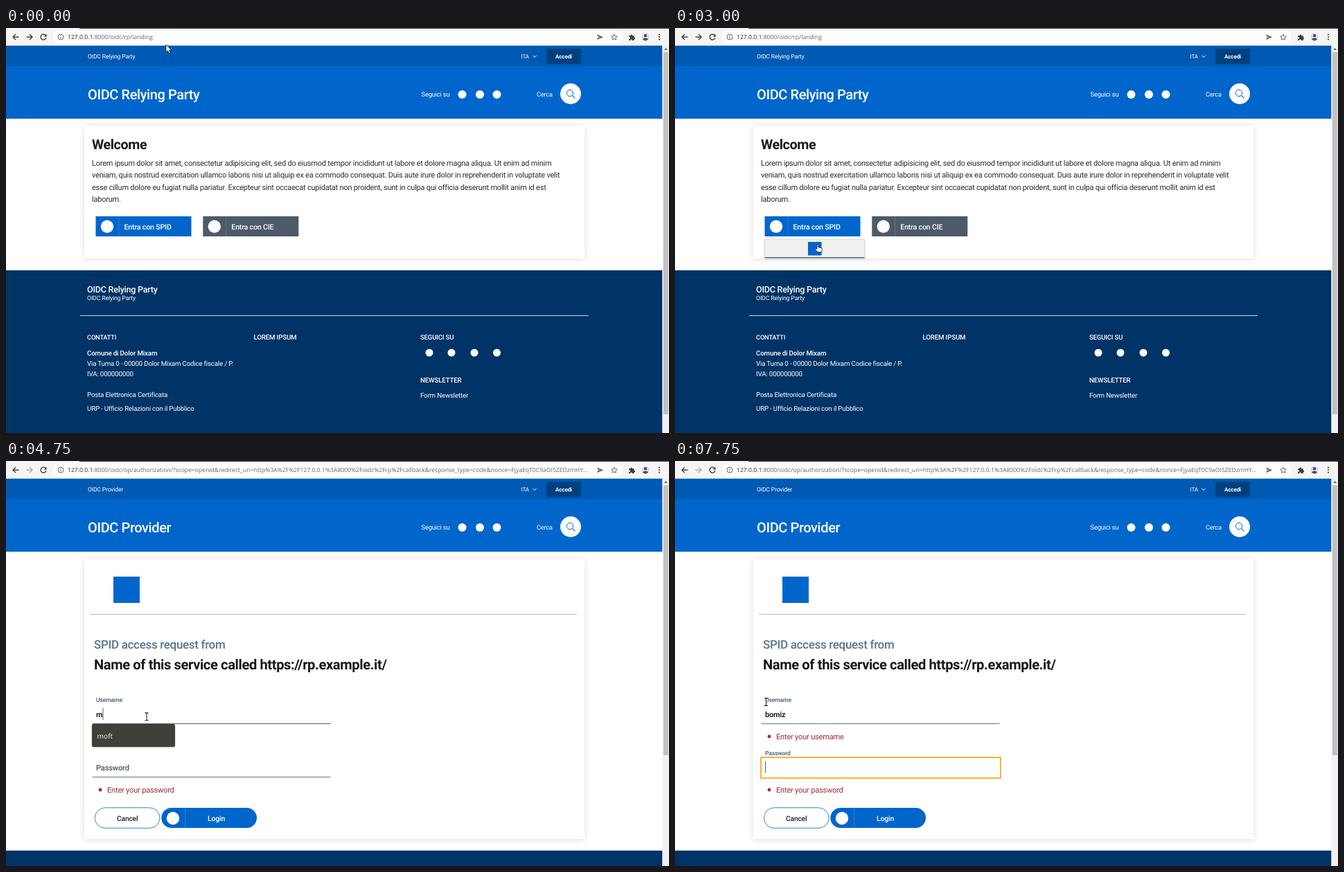
These frames come from a looping animation (957x585 px, 8 s). An HTML page:

```html
<!DOCTYPE html>
<html lang="it">
<head>
<meta charset="utf-8">
<title>OIDC login</title>
<style>
html, body { margin: 0; width: 100%; height: 100%; overflow: hidden; background: #fff; }
svg { display: block; width: 100vw; height: 100vh; }
text { font-family: Roboto, "Open Sans", sans-serif; letter-spacing: -.02em; text-rendering: geometricPrecision; white-space: pre; }
.ui { font-family: "Open Sans", "Noto Sans", sans-serif; letter-spacing: 0; }
</style>
</head>
<body>
<svg id="stage" viewBox="0 0 957 585" xmlns="http://www.w3.org/2000/svg"></svg>
<script>
const LOOP = 8000, TICK = 125;
const BLUE = '#0066cc', INK = '#19191a', SLATE = '#5a768a', RED = '#a32a35', SELECT = '#87a556';

const text = (x, y, str, size, fill = '#fff', weight = 400, extra = '') =>
  `<text x="${x}" y="${y}" font-size="${size}" fill="${fill}" font-weight="${weight}" ${extra}>${str}</text>`;
const rect = (x, y, w, h, fill, extra = '') =>
  `<rect x="${x}" y="${y}" width="${w}" height="${h}" fill="${fill}" ${extra}/>`;
const dot = (x, y, r, fill = '#fff', extra = '') =>
  `<circle cx="${x}" cy="${y}" r="${r}" fill="${fill}" ${extra}/>`;
const line = (d, stroke, width = 1, extra = '') =>
  `<path d="${d}" fill="none" stroke="${stroke}" stroke-width="${width}" ${extra}/>`;
const group = (id, body) => `<g id="${id}">${body}</g>`;
const card = h => rect(113, 141, 722, h, '#fff', 'filter="url(#soft)"');
const shadow = (id, dy, blur, alpha) =>
  `<filter id="${id}" x="-10%" y="-30%" width="120%" height="160%"><feDropShadow dx="0" dy="${dy}" stdDeviation="${blur}" flood-opacity="${alpha}"/></filter>`;

function toolbar() {
  const grey = '#5f6368', dark = '#3c4043';
  return rect(0, 0, 957, 25.5, '#f6f5f4') + rect(106, 0, 851, 1, '#3b3a38')
    + rect(67.5, 3.5, 822, 19, '#fff', 'rx="9.5" id="pill" stroke="#1e8537" stroke-width="0"')
    + line('M18.5 13H10M14 9l-4 4 4 4', dark, 1.4)
    + line('M29.5 13H38M34 9l4 4-4 4', dark, 1.4, 'id="forward"')
    + line('M57.2 10.4A4 4 0 1 0 58 14', dark, 1.4) + `<path d="M58.6 8.6v4h-4z" fill="${dark}"/>`
    + dot(79, 13, 4, 'none', `stroke="${grey}"`) + line('M79 12.4v2.8M79 10.5v1.1', grey, 1.1)
    + '<rect id="mark" y="7.5" x="88.5" height="11.5" fill="' + SELECT + '"/>'
    + '<text class="ui" id="url" x="89" y="16.2" font-size="8.6"><tspan id="host">127.0.0.1</tspan><tspan id="path"></tspan></text>'
    + `<path d="M853 9.3l9.3 3.9-9.3 3.9 1.4-3.3 4-.6-4-.6z" fill="${grey}"/>`
    + line('M878 9l1.3 2.8 3 .3-2.3 2 .7 3-2.7-1.6-2.7 1.6.7-3-2.3-2 3-.3z', grey, 1)
    + `<path d="M899 11h2.2a1.6 1.6 0 1 1 3.2 0h2.2v2.3a1.5 1.5 0 1 1 0 3V18H904a1.4 1.4 0 1 0-2.8 0H899v-2.4a1.4 1.4 0 1 0 0-2.6z" fill="${dark}"/>`
    + dot(923, 13, 5.6, '#d5dbe6') + dot(923, 11, 2.2, '#46526b')
    + '<path d="M918.8 16.6q4.2-4.6 8.4 0q-4.2 3.6-8.4 0z" fill="#46526b"/>'
    + [9.5, 13, 16.5].map(y => dot(943, y, 1.1, dark)).join('');
}

function header() {
  return rect(0, 25, 948, 106, BLUE) + rect(0, 25, 948, 30, '#0059b3')
    + text(118, 44, '', 8.6, '#fff', 400, 'id="brand"')
    + text(118, 102.5, '', 20, '#fff', 500, 'id="title"')
    + text(743.5, 44, 'ITA', 8.2) + line('M760.5 39.7l2.6 2.6 2.6-2.6', '#fff', 1)
    + rect(780, 30, 50, 22, '#004080', 'rx="2"') + text(793, 44, 'Accedi', 8.1, '#fff', 700)
    + text(599.5, 99, 'Seguici su', 9.4)
    + [658.5, 684, 708.5].map(x => dot(x, 96, 6)).join('')
    + text(766, 99, 'Cerca', 9.2)
    + dot(815, 95, 15) + dot(814, 94, 4.7, 'none', `stroke="${BLUE}"`) + line('M817.4 97.4l4 4', BLUE, 1.1);
}

const entry = (x, fill, label) => rect(x, 272, 138, 29, fill)
  + dot(x + 16.5, 286.7, 9.2) + line(`M${x + 33.5} 272v29`, '#fff', 1, 'opacity=".15"')
  + text(x + 41, 291, label, 10.7, '#fff', 500);

function landing() {
  const body = [
    'Lorem ipsum dolor sit amet, consectetur adipisicing elit, sed do eiusmod tempor incididunt ut labore et dolore magna aliqua. Ut enim ad minim',
    'veniam, quis nostrud exercitation ullamco laboris nisi ut aliquip ex ea commodo consequat. Duis aute irure dolor in reprehenderit in voluptate velit',
    'esse cillum dolore eu fugiat nulla pariatur. Excepteur sint occaecat cupidatat non proident, sunt in culpa qui officia deserunt mollit anim id est',
    'laborum.'];
  const popup = '<path d="M129.5 305.5h6l4-4 4 4h130v26.5h-144z" fill="#f0f0f1" stroke="#dcdfe2" filter="url(#tight)"/>'
    + rect(192, 309, 19.5, 19.5, BLUE) + line('M129.5 331.6h144', '#435a70', 1.2, 'id="rule"');
  return card(192)
    + text(124, 175, 'Welcome', 19.7, INK, 700)
    + body.map((s, i) => text(124, 198.5 + i * 17.5, s, 11, '#2b2b2d')).join('')
    + entry(129.5, BLUE, 'Entra con SPID') + entry(284.3, '#4c5a69', 'Entra con CIE')
    + group('popup', popup)
    + rect(0, 350, 948, 235, '#003366')
    + text(117, 382, 'OIDC Relying Party', 12.6, '#fff', 500)
    + text(117, 392.5, 'OIDC Relying Party', 8.8)
    + line('M107 415.5h734', '#c8d2dd')
    + text(117, 450, 'CONTATTI', 9.3, '#fff', 500)
    + text(357.5, 450, 'LOREM IPSUM', 9.75, '#fff', 500)
    + text(598, 450, 'SEGUICI SU', 9.6, '#fff', 500)
    + text(117, 472.5, 'Comune di Dolor Mixam', 9.8, '#fff', 500)
    + text(117, 488, 'Via Tuma 0 - 00000 Dolor Mixam Codice fiscale / P.', 9.75)
    + text(117, 503, 'IVA: 000000000', 9.85)
    + text(117, 532.5, 'Posta Elettronica Certificata', 9.75)
    + text(117, 552.5, 'URP - Ufficio Relazioni con il Pubblico', 9.75)
    + [611, 643, 676, 708.5].map(x => dot(x, 469, 5.5)).join('')
    + text(598, 512, 'NEWSLETTER', 9.75, '#fff', 500)
    + text(598, 534, 'Form Newsletter', 9.75);
}

const field = (id, y, label) => line(`M124.5 ${y + .5}h344`, '#6b747d', 1, `id="${id}Line"`)
  + dot(136, y + 19, 2.4, RED) + text(146, y + 23.3, `Enter your ${label.toLowerCase()}`, 11.1, RED)
  + text(130, y - 9.7, label, 11.2, '#435a70', 500, `id="${id}Label"`);

function login() {
  return card(405)
    + rect(155, 167, 38, 38, BLUE)
    + line('M121 221.5h703', '#b9bcc0')
    + text(127, 270.5, 'SPID access request from', 17.05, SLATE, 500)
    + text(127, 301, 'Name of this service called https://rp.example.it/', 20.15, INK, 700)
    + field('user', 379, 'Username') + field('pass', 456, 'Password')
    + rect(124, 428.2, 346, 29.8, '#fff', 'id="focus" stroke="#ff9f0a" stroke-width="1.6"')
    + rect(129, 357.5, 0, 16, SELECT, 'id="userMark"')
    + text(130, 369.7, '', 11, '#1f2933', 700, 'id="value"')
    + line('', '#333', .8, 'id="caret"')
    + group('suggest', rect(124, 380, 120, 33, '#403f39', 'rx="2.5" filter="url(#tight)"')
      + text(131.5, 400.5, '', 10.2, '#f4f4f2', 500, 'id="hint" class="ui"'))
    + rect(128.4, 500.8, 93.6, 29.5, '#fff', `rx="14.7" stroke="${BLUE}" stroke-width=".8"`)
    + text(160, 520.2, 'Cancel', 10.3, '#17242f', 500)
    + rect(224.3, 501, 137.7, 29, BLUE, 'rx="14.5"') + dot(241, 516, 9.2)
    + line('M258.5 501v29', '#fff', 1, 'opacity=".15"')
    + text(291, 520.2, 'Login', 10.5, '#fff', 500)
    + rect(0, 562.7, 948, 23, '#003366');
}

const beam = 'M-2.6-5.4h2l.6.6.6-.6h2M-2.6 5.4h2l.6-.6.6.6h2M0-5v10';
const pointers = group('arrow', '<path d="M0 0v11l2.6-2.3 1.7 3.8 1.9-.8-1.7-3.7h3.5z" fill="#fff" stroke="#222" stroke-width=".9"/>')
  + group('beam', line(beam, '#fff', 2.2) + line(beam, '#222', 1.1))
  + group('hand', '<path d="M-1 .8q1-1.6 2 0v4l4.6 1q1 .3.9 1.5l-.9 4.4H-.6L-3.6 7.4q-.2-1.6 1.3-1L-1 7.4z" fill="#fff" stroke="#222" stroke-width=".9"/>');

document.getElementById('stage').innerHTML =
  `<defs>${shadow('soft', 1, 5, .13)}${shadow('tight', .7, 1.3, .25)}</defs>`
  + rect(0, 0, 957, 585, '#fff') + group('landing', landing()) + group('login', login())
  + header()
  + rect(947.25, 25.5, 9.75, 560, '#f1f1f1') + rect(949, 35, 7, 523, '#c1c1c1', 'id="thumb"')
  + '<path d="M949.8 31.8l2.7-3 2.7 3z" fill="#6a6a6a"/>'
  + toolbar() + group('pointer', pointers);

const $ = id => document.getElementById(id);
const set = (id, attrs) => { for (const k in attrs) $(id).setAttribute(k, attrs[k]); };
const show = (id, on) => set(id, { visibility: on ? 'visible' : 'hidden' });
const write = (id, str) => { if ($(id).textContent !== str) $(id).textContent = str; };

// All times below are in ticks of 125 ms.
const track = [
  [0, 231, 24, 'arrow'], [1, 190, 16, 'beam'], [2, 130, 13, 'beam'], [3, 98, 13, 'beam'], [5, 98, 13, 'beam'],
  [8, 73, 14, 'beam'], [9, 73, 14, 'beam'], [10, 70, 18, 'beam'], [11, 69, 25, 'arrow'], [13, 100, 120, 'arrow'],
  [15, 168, 235, 'arrow'], [16, 191, 265, 'arrow'], [17, 195, 280, 'hand'], [19, 196, 286, 'hand'],
  [22, 206, 312, 'hand'], [28, 206, 312, 'arrow'], [31, 206, 312, 'arrow'], [34, 203, 355, 'beam'],
  [35, 203, 369.3, 'beam'], [45, 203, 369.3, 'beam'], [46, 168, 364, 'beam'], [47, 125, 362, 'beam'],
  [48, 125, 362, 'beam'], [49, 131.5, 348, 'beam'], [64, 131.5, 348, 'beam']];
const typed = [[0, ''], [38, 'm'], [39, 'mo'], [41, 'mof'], [42, 'moft'],
  [49, 'b'], [50, 'bo'], [56, 'bom'], [58, 'bomi'], [60, 'bomiz']];
const AUTH = ':8000/oidc/op/authorization/?scope=openid&redirect_uri=http%3A%2F%2F127.0.0.1%3A8000%2Foidc%2Frp%2Fcallback&response_type=code&nonce=FjyaEqT0C9aOI5ZEDzmHY…';

const clamp = v => Math.max(0, Math.min(1, v));
const last = (list, k) => list.filter(e => e[0] <= k).pop();

function movePointer(k) {
  const a = last(track, k), b = track[track.indexOf(a) + 1] || a;
  const p = b === a ? 0 : (k - a[0]) / (b[0] - a[0]);
  const at = i => a[i] + (b[i] - a[i]) * p;
  set('pointer', { transform: `translate(${at(1)} ${at(2)})` });
  for (const kind of ['arrow', 'beam', 'hand']) show(kind, a[3] === kind);
}

function floatLabel(id, base, p) {
  set(id, { y: base - 21.5 * p, 'font-size': 11.2 - 2.6 * p });
}

function draw(ms) {
  const k = Math.floor(ms / TICK), auth = k >= 28;
  const name = auth ? 'OIDC Provider' : 'OIDC Relying Party';
  show('landing', !auth);
  show('login', auth);
  write('brand', name);
  write('title', name);
  set('thumb', { height: auth ? 390 : 523 });
  set('forward', { opacity: auth ? .4 : 1 });

  const picked = k >= 5 && k < 18;
  write('path', auth ? AUTH : ':8000/oidc/rp/landing');
  set('host', { fill: picked ? '#fff' : '#202124' });
  set('path', { fill: picked ? '#fff' : '#5f6368' });
  set('pill', { 'stroke-width': picked ? 1.6 : 0 });
  set('mark', { width: picked ? $('url').getComputedTextLength() + 1 : 0 });

  const open = !auth && k >= 19;
  show('popup', open);
  set('popup', { opacity: clamp((k - 18) / 2) });
  show('rule', open && k >= 24);

  const value = last(typed, k)[1], marked = k === 47 || k === 48;
  const onPass = k >= 61, focused = k >= 35;
  write('value', value);
  const width = value ? $('value').getComputedTextLength() : 0;
  set('value', { fill: marked ? '#fff' : '#1f2933' });
  set('userMark', { width: marked ? width + 2 : 0 });
  floatLabel('userLabel', 369.5, clamp((k - 34) / 3));
  floatLabel('passLabel', 446.5, clamp((k - 60) / 2));
  set('userLine', { stroke: focused && !onPass ? '#555c63' : '#6b747d' });
  show('focus', onPass);
  show('caret', focused && !marked && k !== 55);
  set('caret', { d: onPass ? 'M130.5 433.5v17' : `M${130.7 + width} 357v17` });
  show('suggest', (k >= 38 && k < 43) || (k >= 49 && k < 61));
  write('hint', k < 49 ? 'moft' : 'bomiz');
  movePointer(k);
}

function frame(now) {
  draw(now % LOOP);
  requestAnimationFrame(frame);
}
draw(0);
requestAnimationFrame(frame);
</script>
</body>
</html>
```
